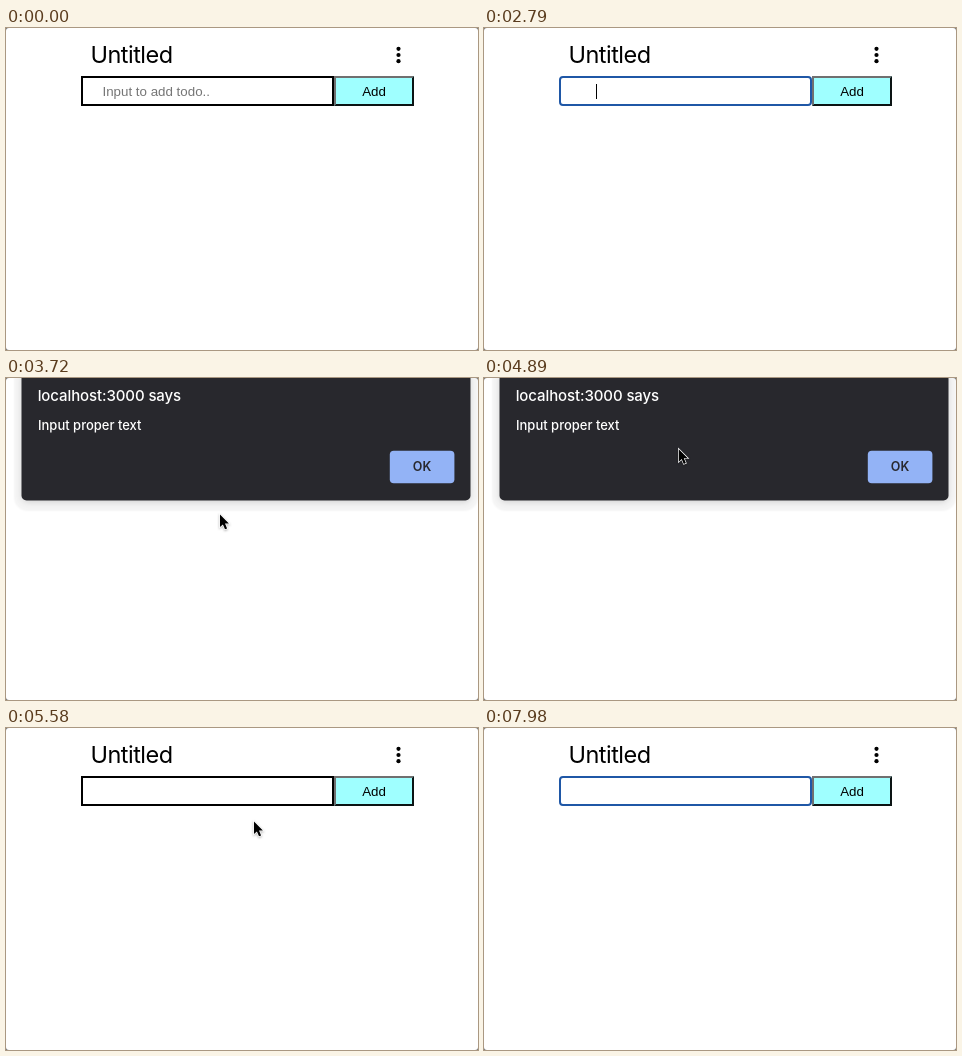
Recreate the animation shown at these times as an HTML page. Size 472 by 322 pixels, loop 8 s.

```html
<!DOCTYPE html>
<html lang="en">
<head>
<meta charset="utf-8">
<title>Todo list</title>
<style>
  html, body { margin: 0; width: 100%; height: 100%; overflow: hidden; background: #777; }
  #stage { position: relative; width: 472px; height: 322px; overflow: hidden; background: #fff; border-radius: 3px; }
  svg { position: absolute; left: 0; top: 0; overflow: visible; }
  .ui { font-family: Inter, Roboto, sans-serif; }
  .form { font: 13.333px "Liberation Sans", Arial, sans-serif; }
  #dialog { position: absolute; left: 16px; top: -8px; width: 448px; height: 130px; transform-origin: 50% 100%; }
  #halo { position: absolute; inset: 0; border-radius: 6px;
    box-shadow: 0 2px 6px rgba(0,0,0,.14), 0 3px 2px 8px rgba(0,0,0,.045); }
</style>
</head>
<body>
<div id="stage">
  <svg width="472" height="322">
    <text class="ui" x="84.4" y="35" font-size="23.5" letter-spacing="-.5">Untitled</text>
    <circle cx="392.5" cy="20.8" r="2.1"/>
    <circle cx="392.5" cy="27" r="2.1"/>
    <circle cx="392.5" cy="33.2" r="2.1"/>
    <rect x="328" y="48" width="80" height="30" fill="#9fffff"/>
    <path d="M328 78V48H408L406 50H330V76Z" fill="#707070"/>
    <path d="M408 48V78H328L330 76H406V50Z" fill="#0c1414"/>
    <rect id="field" x="76" y="49" width="251" height="28" fill="#fff" stroke-width="2"/>
    <text id="hint" class="form" x="96.5" y="67.5" fill="#757575">Input to add todo..</text>
    <text class="form" x="368" y="67.5" text-anchor="middle">Add</text>
    <rect id="caret" y="56" width="1" height="15"/>
  </svg>
  <div id="dialog">
    <div id="halo"></div>
    <svg class="ui" width="448" height="130" font-weight="500" fill="#fff">
      <rect x="-.5" width="449" height="130.5" rx="5" fill="#28282d"/>
      <rect id="edge" x="-.5" y="122" width="449" height="8.5" rx="2"/>
      <text x="15.7" y="30.5" font-size="15" letter-spacing="-.1">localhost:3000 says</text>
      <text x="16" y="59.5" font-size="13">Input proper text</text>
      <rect id="ok" x="367.8" y="80.7" width="64.6" height="32.6" rx="4"/>
      <text x="400" y="101.3" font-size="12.5" font-weight="600" text-anchor="middle" fill="#28282d">OK</text>
    </svg>
  </div>
  <svg width="472" height="322">
    <g id="cursor">
      <path id="arrow" d="M0 .5V13L2.9 10.4L5 15.3L7.1 14.4L5 9.5H8.9Z" stroke="#fff" stroke-width="1.4" paint-order="stroke"
        style="filter:drop-shadow(0 1px 1px rgba(0,0,0,.3))"/>
      <g id="beam" fill="none">
        <path id="bar" d="M-4 -7.5Q0 -7.5 0 -5Q0 -7.5 4 -7.5M0 -6V6M-4 7.5Q0 7.5 0 5Q0 7.5 4 7.5M-2.5 2.5H2.5" stroke-width="1.2"/>
        <use href="#bar" stroke="#000"/>
      </g>
    </g>
  </svg>
</div>
<script>
const LOOP = 8000, TICK = 30, SPACE = 3.7, BLINK = 450;
const FOCUS = 660, TYPE = 2310, KEY_GAP = 160, ALERT = 3510, CLOSE = 5430, REFOCUS = 5610, LAST_KEY = 7530;
const $ = id => document.getElementById(id);

const keys = [0, 1, 2, 3].map(i => TYPE + i * KEY_GAP).concat(LAST_KEY);
const resets = [FOCUS, ...keys, REFOCUS].sort((a, b) => a - b);

// pointer moves: begin, end, and the place reached
const entry = { x: 366, y: 312 };
const moves = [
  { from: 0, to: 450, x: 226, y: 64 },
  { from: 660, to: 810, x: 219, y: 108 },
  { from: 810, to: 900, x: 188, y: 75 },
  { from: 1410, to: 1590, x: 214, y: 136 },
  { from: 4410, to: 4740, x: 128, y: 66 },
  { from: 4740, to: 5220, x: 416, y: 86 },
  { from: 5460, to: 5580, x: 248, y: 93 },
  { from: 5580, to: 5740, x: 201, y: 70 }
];

const between = (t, a, b) => t >= a && t < b;
const inBox = (p, l, t, r, b) => p.x > l && p.x < r && p.y > t && p.y < b;
const show = (el, on) => { el.style.display = on ? '' : 'none'; };

function ease(t, a, b) {
  const k = Math.max(0, Math.min(1, (t - a) / (b - a)));
  return k * k * (3 - 2 * k);
}

function pointerAt(t) {
  return moves.reduce((p, m) => {
    const k = ease(t, m.from, m.to);
    return { x: p.x + (m.x - p.x) * k, y: p.y + (m.y - p.y) * k };
  }, entry);
}

function drawForm(t, open) {
  const count = keys.filter(k => t >= k).length;
  const focused = between(t, FOCUS, 5550) || t >= REFOCUS;
  const since = t - Math.max(0, ...resets.filter(r => r <= t));
  $('field').setAttribute('stroke', focused ? '#1f57a6' : '#000');
  $('field').setAttribute('rx', focused ? 3 : 0);
  show($('hint'), count === 0);
  show($('caret'), focused && !open && since % (2 * BLINK) < BLINK);
  $('caret').setAttribute('x', Math.round(96.8 + count * SPACE));
}

function drawDialog(t, alpha, hover) {
  const gap = 1 - alpha, lean = gap ** 1.2;
  show($('dialog'), alpha > 0);
  $('dialog').style.opacity = alpha;
  $('dialog').style.transform =
    gap ? `translateY(${-28 * lean}px) perspective(400px) rotateX(${13 * lean}deg)` : 'none';
  $('halo').style.opacity = ease(alpha, .55, .85);
  $('edge').style.opacity = t < CLOSE ? gap * .25 : 0;
  $('ok').setAttribute('fill', hover ? '#8fadf0' : '#93b3f6');
}

function draw(t) {
  const alpha = ease(t, ALERT, ALERT + 170) - ease(t, CLOSE, CLOSE + 140);
  const open = alpha > 0, p = pointerAt(t);
  const overField = !open && inBox(p, 75, 48, 328, 78);
  drawForm(t, open);
  drawDialog(t, alpha, inBox(p, 384, 73, 448, 105));
  show($('cursor'), between(t, TICK, TYPE) || between(t, ALERT + TICK, LAST_KEY));
  show($('beam'), overField);
  show($('arrow'), !overField);
  $('cursor').setAttribute('transform', `translate(${p.x} ${p.y})`);
}

const start = performance.now();
function frame() {
  const t = (performance.now() - start) % LOOP;
  draw(t - t % TICK);
  requestAnimationFrame(frame);
}
draw(0);
requestAnimationFrame(frame);
</script>
</body>
</html>
```
